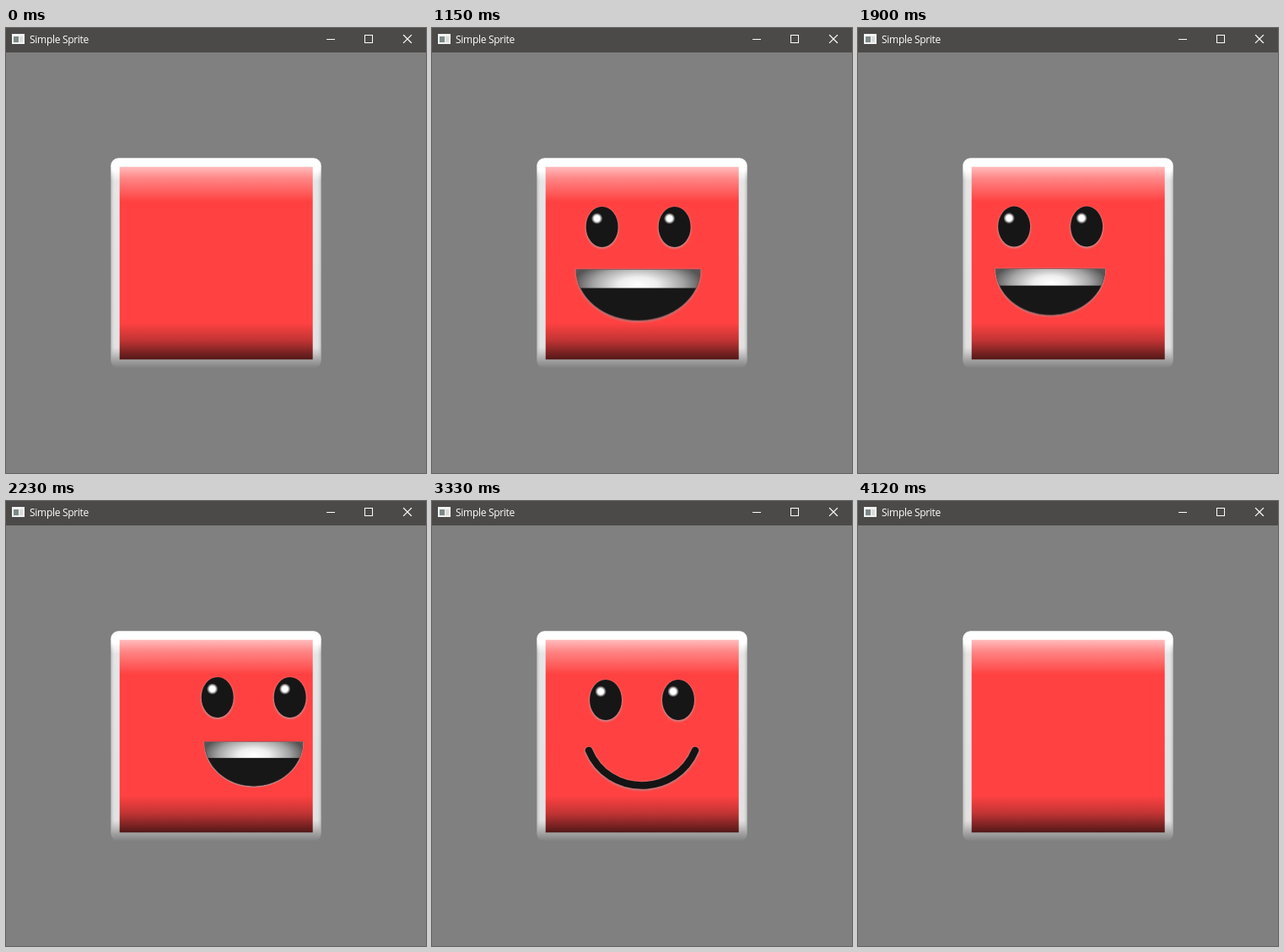
Recreate the animation shown at these times as an HTML page. Size 498 by 528 pixels, loop 4170 ms.

```html
<!DOCTYPE html>
<html lang="en">
<head>
<meta charset="utf-8">
<title>Simple Sprite</title>
<style>
html, body { margin: 0; width: 100%; height: 100%; overflow: hidden; background: #808080; }
svg { display: block; }
text { font: 12px "Open Sans", "Noto Sans", sans-serif; letter-spacing: -.3px; fill: #fff; }
</style>
</head>
<body>
<svg width="498" height="528" viewBox="0 0 498 528">
  <defs>
    <linearGradient id="frame" x2="0" y2="1">
      <stop offset=".06" stop-color="#fff"/>
      <stop offset=".11" stop-color="#e0e0e0"/>
      <stop offset=".9" stop-color="#dcdcdc"/>
      <stop offset=".955" stop-color="#a8a8a8"/>
      <stop offset="1" stop-color="#808080"/>
    </linearGradient>
    <linearGradient id="side">
      <stop offset="0" stop-color="#888" stop-opacity=".45"/>
      <stop offset=".45" stop-color="#fff" stop-opacity=".15"/>
      <stop offset="1" stop-color="#fff" stop-opacity=".2"/>
    </linearGradient>
    <linearGradient id="red" x2="0" y2="1">
      <stop offset="0" stop-color="#ffbcbc"/>
      <stop offset=".06" stop-color="#ff8686"/>
      <stop offset=".18" stop-color="#ff4141"/>
      <stop offset=".81" stop-color="#ff4141"/>
      <stop offset=".9" stop-color="#c23434"/>
      <stop offset="1" stop-color="#521818"/>
    </linearGradient>
    <radialGradient id="teeth" gradientUnits="userSpaceOnUse" cx="0" cy="0" r="1"
      gradientTransform="translate(0 19) scale(78 32)">
      <stop offset="0" stop-color="#fff"/>
      <stop offset=".3" stop-color="#eee"/>
      <stop offset=".7" stop-color="#a4a4a4"/>
      <stop offset="1" stop-color="#555"/>
    </radialGradient>
    <radialGradient id="shine">
      <stop offset=".5" stop-color="#fff"/>
      <stop offset="1" stop-color="#fff" stop-opacity="0"/>
    </radialGradient>
    <filter id="soft" x="-20%" y="-20%" width="140%" height="140%">
      <feGaussianBlur stdDeviation=".9"/>
    </filter>
    <filter id="fade"><feGaussianBlur stdDeviation="0 5"/></filter>
    <path id="lips" d="M-75 0H75A75 61.5 0 0 1-75 0Z"/>
    <path id="curve" d="M-63 9.5C-52 36.5-26 51 0 51S52 36.5 63 9.5"/>
    <clipPath id="inside"><use href="#lips"/></clipPath>
    <rect id="post" y="172" width="11" height="215" fill="url(#side)" filter="url(#fade)"/>
    <g id="eye">
      <ellipse cy="1" rx="19.6" ry="24.6" fill="#c89090" filter="url(#soft)"/>
      <ellipse rx="19" ry="24" fill="#161616"/>
      <circle cx="-6" cy="-10" r="6.8" fill="url(#shine)"/>
    </g>
  </defs>

  <rect width="498" height="528" fill="#808080"/>
  <rect width="498" height="29" fill="#4c4a48"/>
  <g shape-rendering="crispEdges">
    <rect x="7" y="7" width="15" height="12" fill="#f2f2f2"/>
    <rect x="9" y="10" width="6" height="7" fill="#7c8888"/>
    <rect x="16" y="10" width="4" height="7" fill="#d8dcd8"/>
    <path d="M380 13.5H390M425.5 8.5H434.5V17.5H425.5Z" fill="none" stroke="#fff"/>
  </g>
  <path d="M471.5 8.5L480.5 17.5M480.5 8.5L471.5 17.5" stroke="#fff" stroke-width="1.2" stroke-linecap="square"/>
  <text x="28" y="18">Simple Sprite</text>

  <rect x="124.3" y="154.3" width="249.4" height="249.4" rx="9" fill="url(#frame)"/>
  <use href="#post" x="124"/>
  <use href="#post" transform="translate(374) scale(-1 1)"/>
  <rect x="134.7" y="164.7" width="229" height="228.6" fill="url(#red)"/>

  <g id="face">
    <use id="left" href="#eye"/>
    <use id="right" href="#eye"/>
    <g id="laugh">
      <use href="#lips" y=".8" fill="#161616" stroke="#c48c8c" stroke-width="1.6" filter="url(#soft)"/>
      <g clip-path="url(#inside)">
        <rect x="-75" width="150" height="62" fill="#181717"/>
        <rect x="-75" width="150" height="22.5" fill="url(#teeth)"/>
      </g>
      <use href="#lips" fill="none" stroke="#7a5050" stroke-opacity=".5"/>
    </g>
    <g id="smile" fill="none" stroke-linecap="round">
      <use href="#curve" y=".7" stroke="#c08080" stroke-width="10.4" filter="url(#soft)"/>
      <use href="#curve" stroke="#141414" stroke-width="8.6"/>
    </g>
  </g>
</svg>
<script>
const LOOP = 4170, SWAP = 3060, MID = 249, FLOOR = 390;
const $ = id => document.getElementById(id);

// Motion runs in bursts of even steps: first, last, count
const bursts = [
  [50, 330, 6], [360, 560, 5], [1150, 1440, 7],
  [1900, 2230, 7], [2820, 3330, 9], [3790, 4120, 8]
];

function snap(time) {
  const burst = bursts.filter(b => b[0] <= time).pop();
  if (!burst) return 0;
  const [first, last, count] = burst;
  const step = (last - first) / (count - 1);
  return Math.min(last, first + Math.floor((time - first) / step + .01) * step);
}

function place(id, x, y, sx, sy) {
  $(id).setAttribute("transform", `translate(${x} ${y}) scale(${sx} ${sy})`);
}

function show(id, on) {
  $(id).style.display = on ? "" : "none";
}

function draw(now) {
  const t = snap(now % LOOP);
  const ramp = (a, b) => Math.min(1, Math.max(0, (t - a) / (b - a)));

  const rise = 1 - (1 - ramp(0, 560)) ** 1.6;
  const scale = rise * (1 - ramp(3740, 4120));
  const wake = ramp(330, 560);
  const open = .15 + .85 * wake * (1 - ramp(3740, 3920));
  const turn = ramp(1850, 2230);
  const toLeft = ramp(1102, 1440) - turn;
  const toRight = turn - ramp(2760, 3330);

  const x = MID - 30.8 * toLeft + 44.7 * toRight;
  const eyeY = 236 - 3 * toRight;
  const size = 1.05 - .05 * wake;
  const wide = 1 - .12 * toLeft - .22 * toRight;
  const tall = 1 - .1 * toLeft - .14 * toRight;
  const mouthY = 286.5 - toLeft - toRight;

  place("left", x - 43 * size, eyeY, size, size * open);
  place("right", x + 43 * size, eyeY, size, size * open);
  place("laugh", x, mouthY, wide, tall);
  place("smile", x, mouthY, wide, tall);
  show("laugh", t < SWAP);
  show("smile", t >= SWAP);
  show("face", scale > .01);
  $("face").setAttribute("transform",
    `translate(${MID} ${FLOOR}) scale(${scale}) translate(${-MID} ${-FLOOR})`);
}

const start = performance.now();
function loop() {
  draw(performance.now() - start);
  requestAnimationFrame(loop);
}
loop();
</script>
</body>
</html>
```
